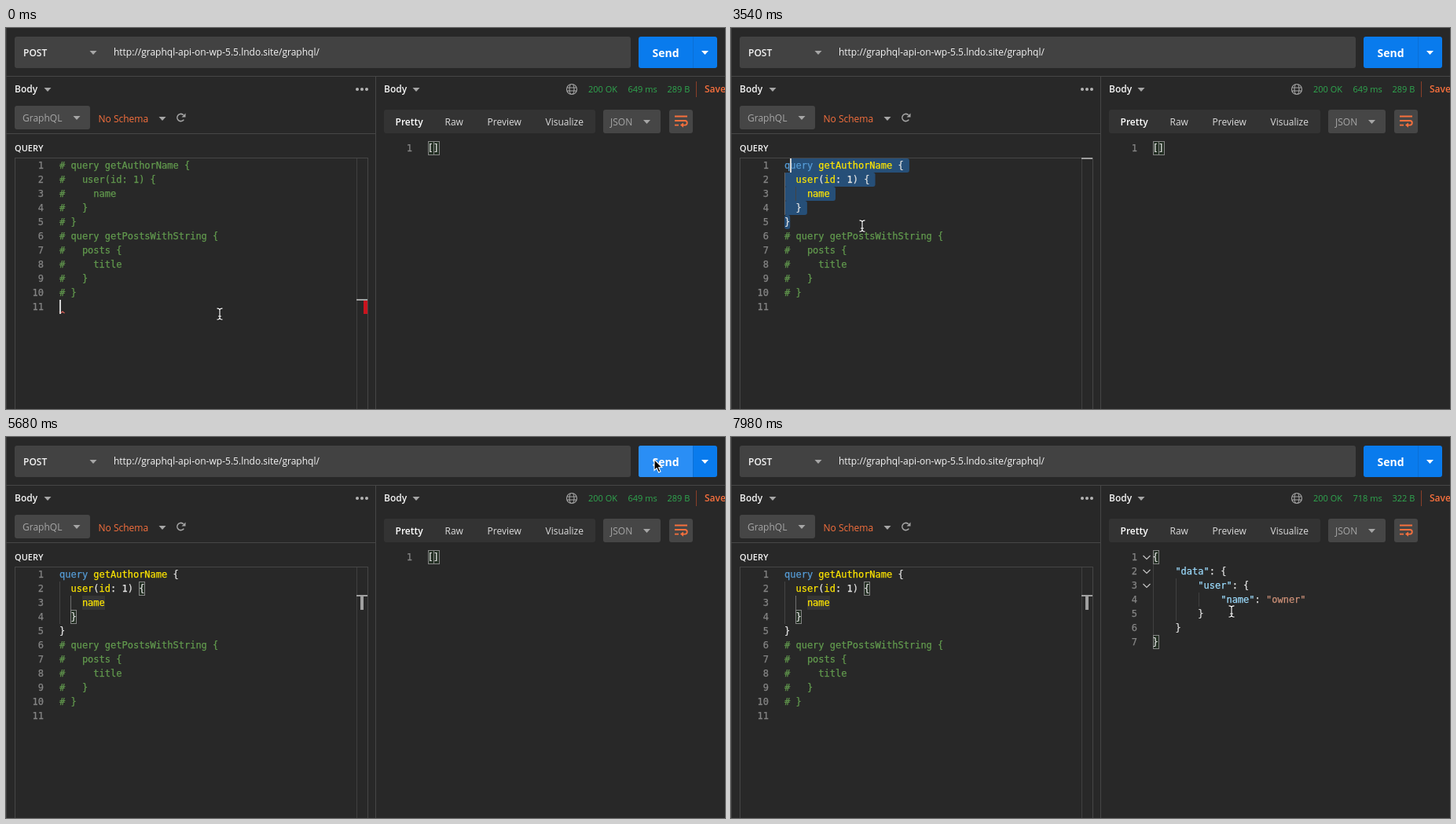
Animation of 915x485 px, one loop 8000 ms. Source, as an HTML page with a canvas:

```html
<!DOCTYPE html>
<html lang="en">
<head>
<meta charset="utf-8">
<title>GraphQL request</title>
<style>
html, body { margin: 0; width: 100%; height: 100%; overflow: hidden; background: #282828; }
canvas { display: block; width: 915px; height: 485px; }
</style>
</head>
<body>
<canvas id="stage"></canvas>
<script>
const W = 915, H = 485, LOOP = 8000;
const CW = 7.224, LH = 18;          // code cell
const ED_X = 68, ED_Y = 166, RES_X = 536.5, RES_Y = 144;
const UI = '"Open Sans", sans-serif', MONO = '"DejaVu Sans Mono", monospace';
const C = {
  bg: '#282828', line: '#464646', box: '#424242', button: '#464646', tabs: '#333333',
  text: '#f4f4f4', tab: '#dcdcdc', soft: '#a6a6a6', num: '#858585', mark: '#a0a0a0',
  orange: '#f8703d', green: '#2fa84f', blue: '#097bed', hover: '#2a8ef5', busy: '#1e5692',
  comment: '#629a4e', field: '#ffe600', keyword: '#569cd6', code: '#e4e4e4',
  select: '#264f78', key: '#9cdcfe', string: '#ce9178'
};

// Moments of the story, in ms
const T = { select: 2360, uncomment: 3540, click: 4460, match: 4550, word: 4720,
  blur: 5680, send: 5770, load: 5840, reply: 7530, folds: 7710 };

const START = [272, 364];
const MOVES = [   // pointer: start, duration, goal
  { at: 860, dur: 580, to: [167, 252] },
  { at: 4020, dur: 260, to: [165, 217] },
  { at: 4630, dur: 780, to: [825, 28] },
  { at: 6060, dur: 410, to: [524, 282] },
  { at: 7800, dur: 180, to: [637, 222] }
];
const CARETS = [  // caret: time, line, column
  [-140, 11, 0], [1710, 5, 3], [2360, 4, 3], [2460, 3, 3], [2610, 2, 3], [3060, 1, 3],
  [T.uncomment, 1, 1], [T.click, 3, 8]
];

const AUTHOR = ['query getAuthorName {', '  user(id: 1) {', '    name', '  }', '}'];
const POSTS = ['query getPostsWithString {', '  posts {', '    title', '  }', '}'];
const REPLY = JSON.stringify({ data: { user: { name: 'owner' } } }, null, 4).split('\n');

const canvas = document.getElementById('stage');
const g = canvas.getContext('2d');
const dpr = window.devicePixelRatio || 1;
canvas.width = W * dpr;
canvas.height = H * dpr;

const snap = (v, step) => Math.floor(v / step) * step;
const isSending = t => t >= T.send && t < T.reply;

// Quick start, long settle, refreshed every 87 ms.
function pointerAt(t) {
  let [x, y] = START;
  for (const { at, dur, to } of MOVES) {
    if (t < at) break;
    const p = t >= at + dur ? 1 : snap(t - at, 87) / dur;
    const e = 1 - (1 - p * p * (3 - 2 * p)) ** 2.2;
    x += (to[0] - x) * e;
    y += (to[1] - y) * e;
  }
  return [x, y];
}

// The blink restarts whenever the caret moves.
function caretAt(t) {
  const [at, line, col] = CARETS.filter(c => c[0] <= t).pop();
  const shown = t < T.blur && Math.floor((t - at) / 500) % 2 === 0;
  return { line, col, shown };
}

function rect(x, y, w, h, color, r = 0) {
  g.fillStyle = color;
  g.beginPath();
  g.roundRect(x, y, w, h, r);
  g.fill();
}

function frame(x, y, w, h, color) {
  g.strokeStyle = color;
  g.lineWidth = 1;
  g.strokeRect(x + .5, y + .5, w - 1, h - 1);
}

function text(s, x, y, color, size = 12, weight = 400, align = 'left') {
  g.font = `${weight} ${size}px ${UI}`;
  g.textAlign = align;
  g.fillStyle = color;
  g.fillText(s, x, y);
}

// A hairline outline gives the code its slightly heavy look.
function mono(s, x, y, color, align = 'left') {
  g.font = `12px ${MONO}`;
  g.textAlign = align;
  g.fillStyle = g.strokeStyle = color;
  g.lineWidth = .25;
  g.fillText(s, x, y);
  g.strokeText(s, x, y);
}

function stroke(color, width, draw) {
  g.strokeStyle = color;
  g.lineWidth = width;
  g.beginPath();
  draw();
  g.stroke();
}

function poly(points, color) {
  g.fillStyle = color;
  g.beginPath();
  points.forEach(([x, y]) => g.lineTo(x, y));
  g.closePath();
  g.fill();
}

const down = (x, y, color = C.soft) => poly([[x - 4.5, y], [x + 4.5, y], [x, y + 5]], color);

// Draws each regex match in the colour chosen for it.
function tokens(s, x, y, pattern, pick) {
  for (const m of s.matchAll(pattern)) mono(m[0], x + m.index * CW, y, pick(m[0], m.index));
}

function bracketBox(x, y) {
  rect(x, y, 8, LH, 'rgba(0,100,0,.12)');
  frame(x, y, 8, LH, '#858585');
}

function drawTop(t, hover) {
  rect(0, 0, 1, H, '#3d3d3d');
  rect(0, 61, W, 1, C.line);
  rect(11, 11, 784, 40, C.box, 3);
  text('POST', 22, 36, C.text, 12, 600);
  down(111, 29);
  text('http://graphql-api-on-wp-5.5.lndo.site/graphql/', 137, 35, C.text);

  if (isSending(t)) {
    rect(805, 11, 100, 40, C.busy, 3);
    text('Sending...', 822, 37, '#a9b5c3', 14, 600);
    return;
  }
  rect(805, 11, 100, 40, C.blue, 3);
  if (hover) rect(805, 11, 69, 40, C.hover, [3, 0, 0, 3]);
  rect(874, 11, 1, 40, '#0a6fd6');
  text('Send', 822.5, 37, '#fff', 14, 700);
  down(889.5, 29, '#fff');
}

function drawLeftHeader() {
  rect(470, 62, 1, H, C.line);
  rect(0, 134, 470, 1, C.line);
  text('Body', 11, 82, C.text, 12, 600);
  down(53, 76);
  for (let i = 0; i < 3; i++) rect(445 + i * 6, 76, 4, 4, '#b4b4b4', 2);
  rect(11, 99, 96, 30, C.button, 3);
  text('GraphQL', 21, 119, C.soft);
  down(90, 112);
  text('No Schema', 117.5, 120, C.orange);
  down(199, 113);
  stroke(C.soft, 1.6, () => g.arc(222.5, 114, 4.6, .6, 5.5));
  poly([[228.5, 108.5], [228.5, 113.5], [223.5, 113.5]], C.soft);
  text('QUERY', 11, 157, C.text, 11, 600);
}

function drawSelection(lines, { line, col }, endCol) {
  for (let n = line; n <= 5; n++) {
    const a = n === line ? col : 0;
    const b = n === 5 ? endCol : lines[n - 1].length + 1;
    rect(ED_X + a * CW, ED_Y + (n - 1) * LH, (b - a) * CW, LH, C.select, 3);
  }
}

function drawEditor(t) {
  const open = t >= T.uncomment, clicked = t >= T.click;
  const note = s => '# ' + s;
  const lines = [...(open ? AUTHOR : AUTHOR.map(note)), ...POSTS.map(note), ''];
  const caret = caretAt(t);
  const rowY = n => ED_Y + (n - 1) * LH;

  frame(11, 165, 450, 330, C.line);
  rect(446, 166, 1, H, '#404040');
  if (t >= T.select && !clicked) drawSelection(lines, caret, open ? 1 : 3);
  if (open) {
    rect(ED_X, rowY(2), 1, 3 * LH, clicked ? '#444' : '#666');
    rect(82, rowY(3), 1, LH, clicked ? '#707070' : '#444');
  }
  if (t >= T.match) {
    bracketBox(169, rowY(2));
    bracketBox(82, rowY(4));
  }
  if (t >= T.word) {
    rect(97, rowY(3), 29, LH, '#353535');
    rect(451, rowY(3), 4, LH, C.mark);
  }

  lines.forEach((s, i) => {
    const y = rowY(i + 1) + 13;
    mono(i + 1, 48, y, C.num, 'right');
    if (s[0] === '#') mono(s, ED_X, y, C.comment);
    else tokens(s, ED_X, y, /[a-z]+|[^a-z\s]+/gi, w =>
      w === 'query' ? C.keyword : /[a-z]/i.test(w) ? C.field : C.code);
  });

  if (!open) {
    rect(455, 347, 5, 17, '#c9141e');
    stroke('#e0605a', 1.2, () => {
      g.moveTo(68, 361);
      g.lineTo(69.5, 363);
      g.lineTo(72, 361);
      g.lineTo(74.5, 363);
    });
  }
  rect(446, rowY(caret.line) - 1, 14, 2, C.mark);
  if (caret.shown) rect(Math.floor(ED_X + caret.col * CW), rowY(caret.line), 2, LH, '#d4d4d4');
}

function drawGlobe(x, y) {
  stroke(C.soft, 1.1, () => {
    g.arc(x, y, 6.5, 0, 7);
    g.moveTo(x + 3, y);
    g.ellipse(x, y, 3, 6.5, 0, 0, 7);
    for (const d of [-2, 2]) { g.moveTo(x - 6, y + d); g.lineTo(x + 6, y + d); }
  });
}

function drawWrapIcon(x, y) {
  stroke(C.orange, 1.8, () => {
    g.moveTo(x, y); g.lineTo(x + 16, y);
    g.moveTo(x, y + 5.5); g.lineTo(x + 13, y + 5.5);
    g.arc(x + 13, y + 8.3, 2.8, -Math.PI / 2, Math.PI / 2);
    g.lineTo(x + 9, y + 11.1);
    g.moveTo(x, y + 11.1); g.lineTo(x + 5, y + 11.1);
  });
  poly([[x + 11, y + 8], [x + 11, y + 14.2], [x + 7, y + 11.1]], C.orange);
}

function drawResponseHeader(t) {
  const done = t >= T.reply;
  text('Body', 481, 82, C.text, 12, 600);
  down(522, 76);
  drawGlobe(720, 78);
  text('200 OK', 741, 82, C.green, 11);
  text(done ? '718 ms' : '649 ms', 791.5, 82, C.green, 11);
  text(done ? '322 B' : '289 B', 841.5, 82, C.green, 11);
  rect(878, 68, 1, 20, '#8a3f28');
  text('Save', 889, 82, C.orange, 12, 600);

  if (!isSending(t)) {
    rect(481, 104, 269, 30, C.tabs, 3);
    rect(760, 104, 73, 30, C.button, 3);
    rect(844, 104, 30, 30, C.button, 3);
  }
  text('Pretty', 495.5, 124, '#fff', 12, 600);
  text('Raw', 558.5, 124, C.tab);
  text('Preview', 612.5, 124, C.tab);
  text('Visualize', 686.5, 124, C.tab);
  text('JSON', 769, 124, C.soft);
  down(815.5, 117);
  drawWrapIcon(851, 112.5);
}

function drawResponse(t) {
  const lines = t >= T.reply ? REPLY : ['[]'];
  const last = lines.length - 1;
  for (let d = 0; 2 * d + 1 < last; d++) {
    rect(Math.floor(RES_X + 1 + d * 4 * CW), RES_Y + (d + 1) * LH, 1, (last - 1 - 2 * d) * LH, '#404040');
  }
  bracketBox(537, RES_Y);
  bracketBox(last ? 537 : 544, RES_Y + last * LH);
  lines.forEach((s, i) => {
    const y = RES_Y + i * LH + 13;
    mono(i + 1, 517, y, C.num, 'right');
    tokens(s, RES_X, y, /"\w+"|[^"\s\w]+/g, (w, at) =>
      w[0] !== '"' ? C.code : s[at + w.length] === ':' ? C.key : C.string);
    if (t >= T.folds && s.endsWith('{')) stroke('#c5c5c5', 1.2, () => {
      g.moveTo(524.5, y - 6); g.lineTo(529, y - 1.5); g.lineTo(533.5, y - 6);
    });
  });
}

function drawSending(t) {
  rect(471, 62, W - 471, H - 62, 'rgba(40,40,40,.8)');
  text('Sending request...', 738, 169, '#fff', 14, 700, 'center');
  rect(688, 200, 100, 32, '#4c4c4c', 3);
  text('Cancel', 738, 220, C.soft, 12, 600, 'center');

  // Loader: one 200px glow per second.
  if (t < T.load) return;
  const x = 271 + 1.14 * (snap(t - T.load, 100) % 1000);
  const glow = g.createLinearGradient(x, 0, x + 200, 0);
  glow.addColorStop(0, 'rgba(255,148,104,0)');
  glow.addColorStop(.4, '#ff9468');
  glow.addColorStop(1, 'rgba(255,148,104,0)');
  g.save();
  g.beginPath();
  g.rect(471, 62, W - 471, 2);
  g.clip();
  rect(x, 62, 200, 2, glow);
  g.restore();
}

function drawBeam(x, y) {
  const shape = () => {
    for (const side of [-1, 1]) {
      g.moveTo(x - 3.5, y + side * 7.2);
      g.quadraticCurveTo(x, y + side * 7.2, x, y + side * 4.8);
      g.quadraticCurveTo(x, y + side * 7.2, x + 3.5, y + side * 7.2);
    }
    g.moveTo(x, y - 5); g.lineTo(x, y + 5);
    g.moveTo(x - 2, y + 3); g.lineTo(x + 2, y + 3);
  };
  stroke('#111', 2.6, shape);
  stroke('#fff', 1.2, shape);
}

function drawArrow(x, y) {
  const pts = [[0, 0], [0, 14], [3.1, 11.2], [5.6, 16.5], [8, 15.4], [5.6, 10.2], [9.8, 10]]
    .map(([a, b]) => [x + a, y + .5 + b]);
  poly(pts, '#000');
  stroke('#fff', 1.1, () => {
    pts.forEach(([a, b]) => g.lineTo(a, b));
    g.closePath();
  });
}

function draw(t) {
  const [x, y] = pointerAt(t);
  g.setTransform(dpr, 0, 0, dpr, 0, 0);
  rect(0, 0, W, H, C.bg);
  drawTop(t, x >= 805);
  drawLeftHeader();
  drawEditor(t);
  drawResponseHeader(t);
  drawResponse(t);
  if (isSending(t)) drawSending(t);
  const overText = x < 446 || (x > 535 && t >= T.reply);
  (overText ? drawBeam : drawArrow)(x, y);
}

function tick() {
  draw(performance.now() % LOOP);
  requestAnimationFrame(tick);
}
tick();
</script>
</body>
</html>
```
